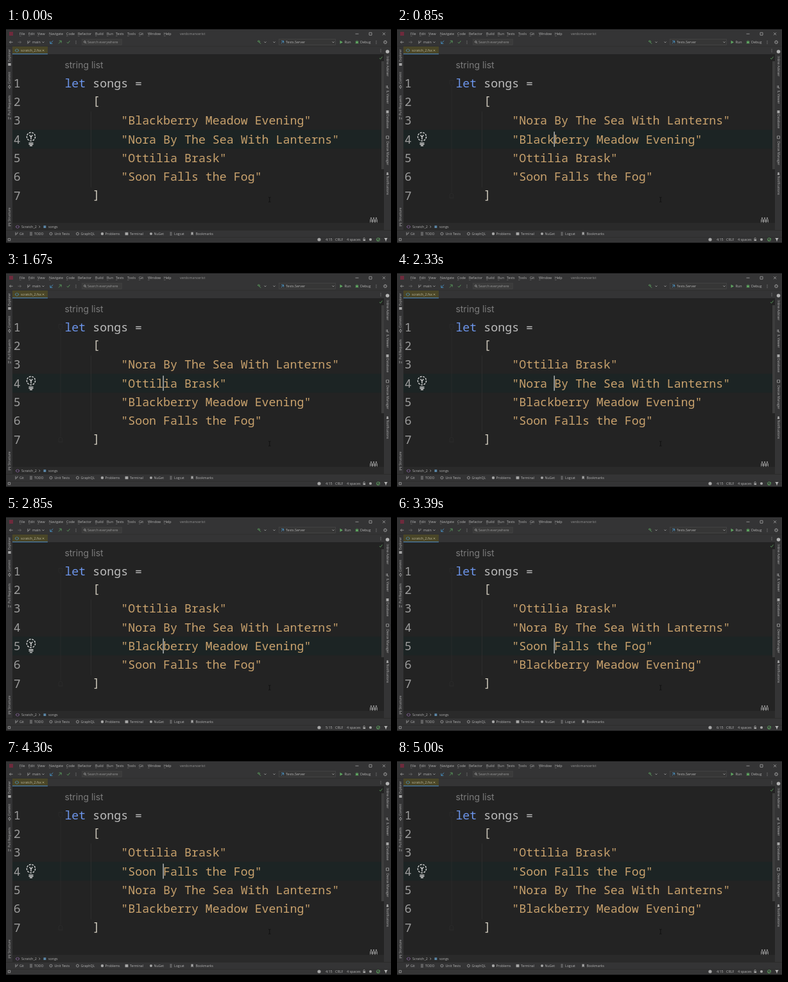
Write an HTML page that moves like this. It is 600 px wide and 338 px high and loops after 5.03 s.

```html
<!DOCTYPE html>
<html lang="en">
<head>
<meta charset="utf-8">
<title>Sorting a list</title>
<style>
html, body { margin: 0; width: 100%; height: 100%; overflow: hidden; background: #000; }
svg { display: block; width: 600px; height: 338px; }
text { white-space: pre; }
.ui { font: 5.4px "Open Sans", "Noto Sans", sans-serif; fill: #b4b4b4; }
.code { font: 500 18.3px "Noto Sans Mono", "DejaVu Sans Mono", monospace; }
.icon { fill: none; stroke-width: .8; }
</style>
</head>
<body>
<svg id="stage" viewBox="0 0 600 338"></svg>
<script>
const stage = document.getElementById('stage');
const LOOP = 5030, LEFT = 91.4, CHAR = 10.98, PITCH = 29.35;
const GREEN = '#5fa561', BLUE = '#4c9fd8', STRING = '#c9a26d', GREY = '#a6a6a6', BAR = '#343435';

function add(tag, attrs, content = '', parent = stage) {
  const node = document.createElementNS('http://www.w3.org/2000/svg', tag);
  for (const key in attrs) node.setAttribute(key, attrs[key]);
  node.textContent = content;
  parent.appendChild(node);
  return node;
}
const box = (x, y, width, height, fill, more = {}) => add('rect', { x, y, width, height, fill, ...more });
const label = (x, y, content, style = '') => add('text', { x, y, class: 'ui', style }, content);
const icon = (d, stroke = GREY, parent = stage) => add('path', { d, class: 'icon', stroke }, '', parent);
const dot = (cx, cy, r, fill) => add('circle', { cx, cy, r, fill });
const ring = (cx, cy, r, stroke = GREY) => add('circle', { cx, cy, r, class: 'icon', stroke });
const chevron = (x, y) => icon(`M${x - 1.5} ${y - .8}l1.5 1.6 1.5-1.6`);
const check = (x, y, color) => icon(`M${x - 2} ${y}l1.5 1.8 3-4`, color);
const frame = (x, y, size = 4) => icon(`M${x - size / 2} ${y - size / 2}h${size}v${size}h${-size}z`);
const dots = (x, y) => [-2, 0, 2].forEach(dy => dot(x, y + dy, .5, GREY));
const baseline = line => 92.5 + PITCH * (line - 1);

// Window panels
box(0, 2, 600, 334, BAR);
box(0, 28.5, 600, .6, '#2a2a2a');
box(10, 41, 579, 264.5, '#232323');
box(585, 52, 4, 169, '#3d3d3d');
box(10, 29, 55, 12, '#4a4628');
box(10, 40, 55, 1.2, '#4a7fae');
box(10, 305.5, 579, 10.5, '#2a2a2a');
box(0, 316, 600, .6, '#262626');
box(0, 327, 600, .6, '#282828');

// Title bar
box(5, 6, 6, 6, '#6e2a3c');
[['File', 21], ['Edit', 35], ['View', 49], ['Navigate', 67], ['Code', 94], ['Refactor', 112], ['Build', 139],
 ['Run', 157], ['Tests', 171], ['Tools', 189], ['Git', 207], ['Window', 221], ['Help', 246]]
  .forEach(([name, x]) => {
    label(x, 11.4, name);
    box(x, 12.2, 2.6, .4, '#909090');
  });
label(271, 11.4, 'verdomancerist', 'fill:#929292');
icon('M544.5 9.2h5M566 7.2h4v4h-4zM587 7.2l4 4m0-4l-4 4');

// Main toolbar
icon('M10.5 22.2h-5m2-2l-2 2 2 2');
icon('M18.5 22.2h5m-2-2l2 2-2 2', '#6c6c6c');
icon('M34 24.8v-5M37 19.8v1.5q0 1.5-3 1.5');
label(41, 24.4, 'main');
chevron(58, 22.2);
icon('M73.3 20l-4.4 4.4m0-3.5v3.5h3.5', BLUE);
icon('M82 24.4l4.2-4.4m-3.4 0h3.4v3.4', GREEN);
check(97, 22.2, GREEN);
dots(109, 22.2);
box(118.5, 17.6, 62, 9, '#3b3b3b', { stroke: '#484848', 'stroke-width': .5 });
ring(122.8, 21.7, 1.4);
icon('M123.8 22.8l1.4 1.4');
label(127, 24.4, 'Search everywhere', 'fill:#969696');
icon('M392 20.7l2-1.2 2 1.8-1.2 1zM394 21.7l3.2 3.2', GREEN);
chevron(404, 22.2);
chevron(418, 22.2);
box(425.5, 17.6, 88, 9, '#363636', { stroke: '#505050', 'stroke-width': .5 });
icon('M429 24.2l3.6-4m-3.6 0h3.6v3.4', BLUE);
label(436, 24.4, 'Tests.Server');
chevron(510, 22.2);
add('path', { d: 'M520.5 19.6l4.4 2.6-4.4 2.6z', fill: GREEN });
label(527.5, 24.4, 'Run');
dot(547, 22.4, 2, GREEN);
icon('M544.3 20.7l5.4 3.4m0-3.4l-5.4 3.4M547 19.2v1.5', GREEN);
label(552, 24.4, 'Debug');
dots(577, 22.2);
ring(591, 22.2, 1.9);
add('circle', { cx: 591, cy: 22.2, r: 2.7, class: 'icon', stroke: GREY, 'stroke-dasharray': '1 1.1' });

// Editor tab
icon('M16.5 32.7l-2.3 2.4 2.3 2.4M17.5 32.7l2.3 2.4-2.3 2.4', BLUE);
label(23, 37.3, 'scratch_2.fsx', 'fill:#bcb89c');
icon('M56.8 33.9l2.6 2.6m0-2.6l-2.6 2.6', '#aaa67c');
dots(584, 35.2);

// Side bars
const vertical = (x, y, angle, name) => add('text', {
  y: 1.8, class: 'ui', transform: `translate(${x} ${y}) rotate(${angle})`, 'text-anchor': 'middle', style: 'font-size:5px'
}, name);
[['Explorer', 43], ['Commit', 78], ['Pull Requests', 121], ['Structure', 292]]
  .forEach(([name, y]) => vertical(5.5, y, -90, name));
box(3.3, 55, 4.4, 4, GREY);
ring(5.5, 92, 1.6);
icon('M5.5 88.8v1.6m0 3.2v1.6M4 139v4M7 140v3M3.5 305.5h4m-4 2h2.5m-2.5 2h4');
[['Inline Adviser', 60], ['IL Viewer', 108], ['Database', 146], ['Device Manager', 196], ['Notifications', 246.5]]
  .forEach(([name, y]) => vertical(594.5, y, 90, name));
dot(594.5, 37, 2.8, '#b4b4b4');
icon('M593 90v4m1.5-4v4h2');
box(592.5, 129, 4, 4.5, GREY);
frame(594.5, 171);
add('path', { d: 'M592.5 230h4l-.7-1v-2a1.3 1.3 0 0 0-2.6 0v2z', fill: GREY });

// Breadcrumbs and tool windows
icon('M17.5 308.8l-2.2 2.3 2.2 2.3M18.5 308.8l2.2 2.3-2.2 2.3', '#a877c4');
label(24, 313.2, 'Scratch_2');
icon('M51.5 309.5l1.5 1.6-1.5 1.6');
box(58.5, 309.2, 3.8, 3.8, '#5b87a8');
label(66, 313.2, 'songs');
[['Git', 21], ['TODO', 44], ['Unit Tests', 75.5], ['GraphQL', 116.5], ['Problems', 154.5], ['Terminal', 193],
 ['NuGet', 230.5], ['Logcat', 262], ['Bookmarks', 295.5]]
  .forEach(([name, x]) => label(x, 323.9, name, 'font-size:5.2px'));
icon('M15 324.5v-5m3 0v1.5q0 1.5-3 1.5M37 320h4m-4 2h4m-4 2h4M255.5 320h3m-3 2h3m-3 2h3');
ring(70, 322, 2);
ring(111.5, 322, 2);
dot(150, 322, 2.2, GREY);
box(185.6, 319.8, 4.8, 4.4, GREY);
dot(226, 322, 2, GREY);
add('path', { d: 'M288.5 319.6h3.2v4.8l-1.6-1.4-1.6 1.4z', fill: GREY });

// Status bar
frame(5, 331, 3.4);
dot(488, 331, 2.6, GREY);
const position = label(498, 333, '');
label(513, 333, 'CRLF');
label(531, 333, '4 spaces');
box(556.5, 330.5, 3.6, 2.6, GREY);
icon('M557 330.5v-1a1.2 1.2 0 0 1 2.4 0');
dot(568, 331, 2.1, GREY);
ring(580, 331, 2.5, GREEN);
check(580, 331, GREEN);
add('path', { d: 'M589.3 328.8h5.4l-2.1 2.7v2h-1.2v-2z', fill: '#c4c4c4' });

// Editor
const band = box(10, 0, 575, PITCH, '#1c2424');
box(132, 130.5, .7, 119, '#333');
const folds = add('g', { opacity: .6 });
icon('M85 90v167M82 82h6v5l-3 3-3-3zM82 266h6v-5l-3-3-3 3z', '#343434', folds);
label(91.4, 63.3, 'string list', 'font:14px Inter,"Open Sans",sans-serif;fill:#7c7c7c');
const code = (x, y, content, fill = '#bdbdbd') => add('text', { x, y, class: 'code', fill }, content);
const column = n => LEFT + CHAR * n;
for (let n = 1; n <= 7; n++) code(11.8, baseline(n), n, '#9c9c9c');
code(column(0), baseline(1), 'let', '#6c95eb');
code(column(4), baseline(1), 'songs =');
code(column(4), baseline(2) - 1.5, '[', '#cdc8bb');
code(column(4), baseline(7) - 1.5, ']', '#cdc8bb');
const songs = {
  B: 'Blackberry Meadow Evening',
  N: 'Nora By The Sea With Lanterns',
  O: 'Ottilia Brask',
  S: 'Soon Falls the Fog'
};
const rows = {};
for (const key in songs) rows[key] = code(column(8), 0, `"${songs[key]}"`, STRING);
const caret = box(column(14) - .6, 0, 1.2, 23.5, '#d8d8d8');

const bulb = add('g', { fill: 'none', stroke: '#d6d6d6', 'stroke-width': 1.4 });
add('circle', { cx: 39, cy: -4, r: 6.6, 'stroke-dasharray': '3 1.6' }, '', bulb);
add('path', { d: 'M36.6 -6.5l2.4 2.8 2.4-2.8M39 -3.7v4.2M35.5 5.8h7M35.5 8h7M37 10.2h4' }, '', bulb);

check(584, 47, GREEN);
icon('M409 265h1.2l.6.6.6-.6h1.2M410.8 265.6v6M409 272.2h1.2l.6-.6.6.6h1.2', '#0c0c0c');
[569, 573, 577].forEach(x => {
  dot(x, 297.6, 1.1, GREY);
  icon(`M${x - 1.4} 304.5v-4.8h2.8v4.8M${x - 1.4} 302h2.8`);
});

// Each key press: time, caret line, order of the songs
const steps = [
  [-1000, 4, 'BNOS'], [390, 3, 'NBOS'], [580, 4, 'NBOS'], [1050, 5, 'NBOS'], [1400, 4, 'NOBS'], [1850, 3, 'ONBS'],
  [2080, 4, 'ONBS'], [2650, 5, 'ONBS'], [2860, 6, 'ONBS'], [3350, 5, 'ONSB'], [4050, 4, 'OSNB']
];
const stepAt = t => steps.filter(step => step[0] <= t).pop();
const show = (node, on) => node.setAttribute('visibility', on ? 'visible' : 'hidden');

function draw(t) {
  const [start, line, order] = stepAt(t);
  const age = t - start;
  const middle = 86 + PITCH * (line - 1);
  [...order].forEach((key, i) => rows[key].setAttribute('y', baseline(i + 3)));
  band.setAttribute('y', middle - PITCH / 2);
  caret.setAttribute('y', middle - 11.8);
  bulb.setAttribute('transform', `translate(0 ${middle})`);
  // The opening pose holds the caret in the dark half of its blink.
  show(caret, start >= 0 && age % 1000 < 500);
  show(bulb, age > 200);
  show(folds, t >= 580);
  position.textContent = `${stepAt(t - 100)[1]}:15`;
}

function tick() {
  draw(performance.now() % LOOP);
  requestAnimationFrame(tick);
}
tick();
</script>
</body>
</html>
```
